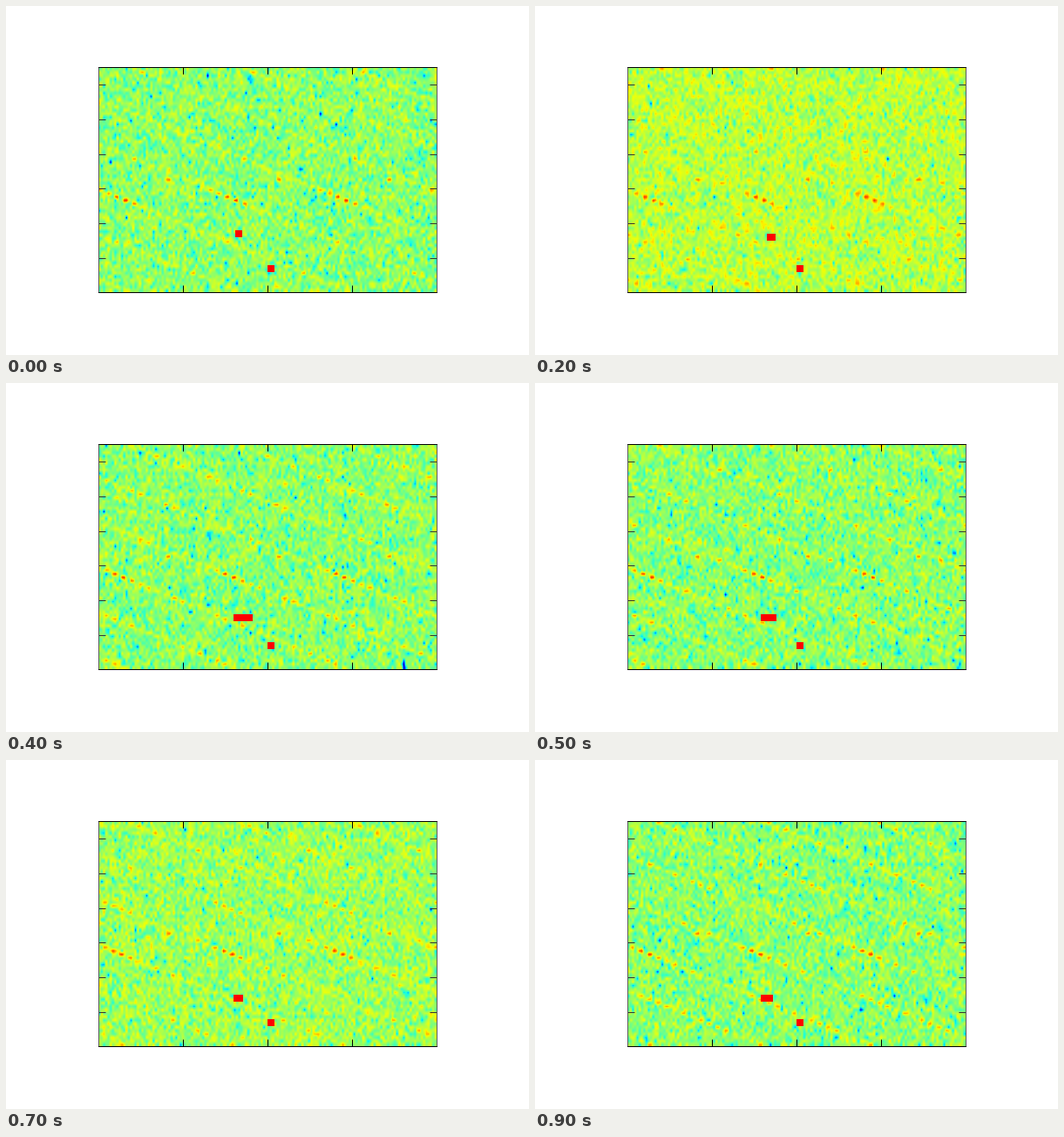
A matplotlib script for the animation above (1 s loop, 600 by 400 pixels).

```python
import matplotlib.pyplot as plt
import numpy as np
from matplotlib.animation import FuncAnimation

PX = 0.72  # points per pixel at 100 dpi
FRAMES = 10
WIDTH, ROWS = 200, 65
CELLS = 150
PERIOD = 65.33
STEP = PERIOD / 13
CENTRES = (np.arange(CELLS) + 0.5) * WIDTH / CELLS

# Key points: edges of the detected patch, and how warm the background is
KEYS = (0, 1, 3, 4, 6, 8, 9)
LEFT = (83, 84, 85, 82, 80, 84, 81)
RIGHT = (83, 84, 87, 89, 83, 84, 84)
WARMTH = (0, 1, 0.7, 0, 0, 0.7, 0)


def key_value(n, values):
    return np.interp(n, KEYS, values)


def add_dots(grid, row, column, level):
    """Blend one periodic set of round dots into a row."""
    distance = (CENTRES - column + PERIOD / 2) % PERIOD - PERIOD / 2
    grid[row] += (level - grid[row]) * np.exp(-(distance / 1.5) ** 4)


def make_grid(n):
    rng = np.random.default_rng(100 + n)
    warmth = key_value(n, WARMTH)
    noise = np.log(rng.gamma(2.5, size=(ROWS, CELLS)))
    noise = (noise - noise.mean()) / noise.std()
    grid = 0.515 + 0.065 * warmth + (0.08 - 0.01 * warmth) * noise
    grid = np.clip(grid, 0.03, 0.69)
    for row in range(ROWS):
        # A bright ridge, with more of the other rows lighting up over time
        ridge = 0.63 + 0.27 * np.exp(-((row - 26.4) / 1.9) ** 2)
        lit = rng.random() < 0.12 + 0.03 * n
        level = max(ridge, 0.74 * lit) + rng.uniform(-0.02, 0.02)
        add_dots(grid, row, 81.4 + STEP * (26 - row) - 0.31 * n, level)
    add_dots(grid, 32, 41.6, 0.80)
    return grid


fig = plt.figure(figsize=(6, 4), dpi=100, facecolor="white")
ax = fig.add_axes([106.36 / 600, 71.6 / 400, 387.28 / 600, 258 / 400])
image = ax.imshow(make_grid(0), cmap="jet", vmin=0, vmax=1, origin="lower",
                  extent=(0, WIDTH, 0, ROWS), aspect="auto",
                  interpolation="bilinear")
markers, = ax.plot([], [], "s", color="red", markersize=8 * PX,
                   markeredgewidth=0, zorder=3)
ax.set(xlim=(0, WIDTH), ylim=(0, ROWS),
       xticks=range(0, WIDTH + 1, 50), yticks=range(0, ROWS, 10))
ax.tick_params(direction="in", length=8 * PX, width=PX, top=True, right=True,
               labelbottom=False, labelleft=False)
ax.tick_params(axis="y", color="0.2")
for side, spine in ax.spines.items():
    spine.set_linewidth(PX)
    spine.set_color("0.35" if side in ("left", "right") else "black")


def update(n):
    patch = np.linspace(key_value(n, LEFT), key_value(n, RIGHT), 3)
    height = round(16.6 - 0.33 * n)
    image.set_data(make_grid(n))
    markers.set_data([*patch, 102], [height] * 3 + [7])
    return image, markers


animation = FuncAnimation(fig, update, frames=FRAMES, interval=100,
                          repeat=True, repeat_delay=0)
plt.show()
```
